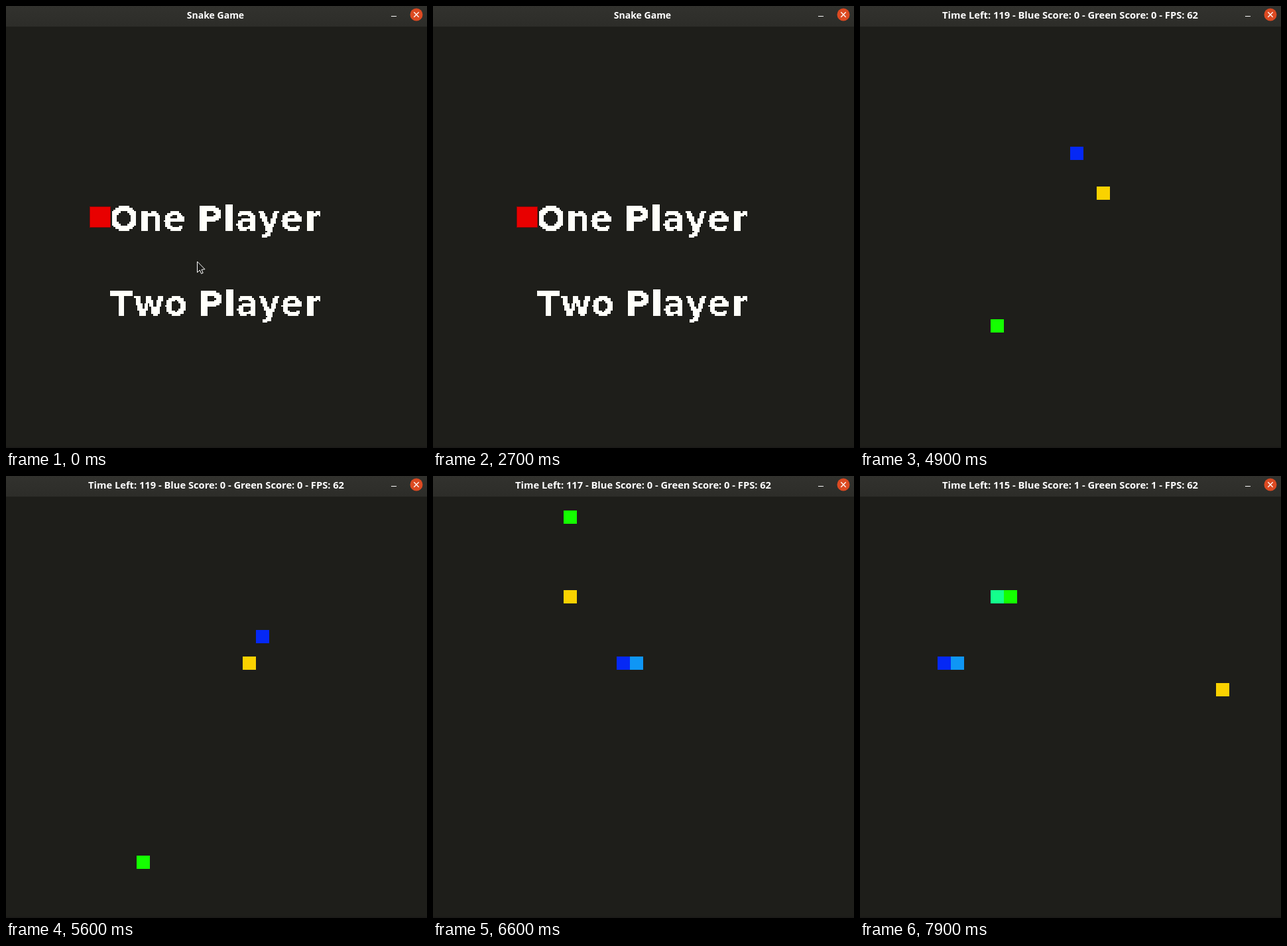
Animation, 635 px wide and 666 px high, one loop 8000 ms. Source, as an HTML page with a canvas:

```html
<!DOCTYPE html>
<html lang="en">
<head>
<meta charset="utf-8">
<title>Snake Game</title>
<style>
  html, body { margin: 0; width: 100%; height: 100%; overflow: hidden; background: #1e1e1a; }
  canvas { display: block; }
</style>
</head>
<body>
<canvas id="stage" width="635" height="666"></canvas>
<script>
const ctx = document.getElementById('stage').getContext('2d');
const LOOP = 8000, GAME_START = 3900, BACKGROUND = '#1e1e1a';
const CELL = 20, LEFT = -3, TOP = 32, GRID = 32, TICK = 161;
const DIRS = { U: [0, -1], D: [0, 1], L: [-1, 0], R: [1, 0] };

// A run of steps at an even pace, shown on the nearest tenth of a second
function run(path, from, every = TICK) {
  return [...path].map((dir, i) => ({ dir, time: Math.round((from + i * every) / 100) * 100 }));
}

const snakes = [
  {
    start: [10, 16], head: '#14ff00', tail: '#14ff8c',
    steps: [...run('D'.repeat(7), 4080), ...run('D'.repeat(16), 5130, 165), ...run('R', 7900)]
  },
  {
    start: [16, 15], head: '#0528f5', tail: '#0f96f5',
    steps: [...run('U'.repeat(7), 4080), ...run('RRRDDDD', 5130, 123), ...run('L'.repeat(13), 5968)]
  }
];
const foods = [[18, 12], [10, 7], [27, 14]];
const allSteps = snakes
  .flatMap((snake, id) => snake.steps.map(step => ({ ...step, id })))
  .sort((a, b) => a.time - b.time);

function play(t) {
  const players = snakes.map(({ start }) => ({ body: [start], score: 0 }));
  let eaten = 0;
  for (const { id, dir, time } of allSteps) {
    if (time > t) break;
    const player = players[id], [x, y] = player.body[0], [dx, dy] = DIRS[dir];
    const head = [x + dx, (y + dy + GRID) % GRID];
    player.body = [head, ...player.body].slice(0, player.score + 1);
    if (String(head) === String(foods[eaten])) {
      player.score++;
      eaten++;
    }
  }
  return { players, food: foods[eaten] };
}

function box(x, y, w, h, color) {
  ctx.fillStyle = color;
  ctx.fillRect(x, y, w, h);
}

function line(color, width, ...points) {
  ctx.beginPath();
  points.forEach(([x, y]) => ctx.lineTo(x, y));
  ctx.strokeStyle = color;
  ctx.lineWidth = width;
  ctx.stroke();
}

function cell([col, row], color) {
  box(LEFT + col * CELL, TOP + row * CELL, CELL, CELL, color);
}

// Hard-edged small text on whole-pixel advances, to be magnified
function pixelText(text) {
  const small = document.createElement('canvas');
  const c = small.getContext('2d', { willReadFrequently: true });
  const font = 'bold 20px "DejaVu Sans", sans-serif';
  c.font = font;
  const advances = [...text].map(ch => ch === ' ' ? 6 : Math.round(c.measureText(ch).width));
  small.width = advances.reduce((sum, w) => sum + w);
  small.height = 24;
  c.font = font;
  c.fillStyle = '#fffffa';
  let x = -0.5;
  [...text].forEach((ch, i) => {
    c.fillText(ch, x, 19);
    x += advances[i];
  });
  const image = c.getImageData(0, 0, small.width, small.height);
  for (let i = 3; i < image.data.length; i += 4) {
    image.data[i] = image.data[i] > 155 ? 255 : 0;
  }
  c.putImageData(image, 0, 0);
  return small;
}
const options = ['One Player', 'Two Player'].map(pixelText);

function drawWindow(title, size, center) {
  box(0, 0, 635, 666, BACKGROUND);
  const bar = ctx.createLinearGradient(0, 0, 0, 30);
  bar.addColorStop(0, '#32322e');
  bar.addColorStop(1, '#2d2d29');
  box(0, 0, 635, 31, bar);
  box(0, 664, 635, 2, '#1b1a18');

  ctx.font = `bold ${size}px "Open Sans", sans-serif`;
  ctx.textAlign = 'center';
  ctx.fillStyle = '#fff';
  ctx.fillText(title, center, 19);

  box(581, 15, 8, 1, '#fff');
  ctx.beginPath();
  ctx.arc(619, 13, 9.5, 0, Math.PI * 2);
  ctx.fillStyle = '#dc4a22';
  ctx.fill();
  line('#fff', 1.3, [615.3, 9.3], [622.7, 16.7]);
  line('#fff', 1.3, [622.7, 9.3], [615.3, 16.7]);
}

function drawPointer() {
  const arrow = new Path2D('M288.5 385v16.5l3.8-3.5 2.3 5.3 2.6-1.1-2.2-5 5-.5z');
  ctx.fillStyle = '#1b1b18';
  ctx.fill(arrow);
  ctx.strokeStyle = '#fff';
  ctx.lineWidth = 1;
  ctx.stroke(arrow);
}

function drawMenu(t) {
  drawWindow('Snake Game', 14, 316);
  const second = (t >= 1100 && t < 2700) || t >= 3000;
  const y = second ? 430 : 302;
  box(126, y, 32, 32, '#900403');
  box(127, y + 1, 30, 30, '#e80000');
  ctx.imageSmoothingEnabled = false;
  options.forEach((image, i) => ctx.drawImage(image, 157, 288 + i * 128, 320, 64));
  if (t < 200) drawPointer();
}

function drawGame(t) {
  // The title is refreshed once a second
  const updates = Math.floor((t - GAME_START) / 1000);
  const [green, blue] = play(GAME_START + updates * 1000).players;
  const timeLeft = 120 - Math.round(updates * 1.3);
  const fps = updates ? 62 : 646;
  drawWindow(`Time Left: ${timeLeft} - Blue Score: ${blue.score} - Green Score: ${green.score} - FPS: ${fps}`,
    14.7, 317);

  const { players, food } = play(t);
  cell(food, '#fad200');
  players.forEach(({ body }, id) =>
    body.forEach((part, i) => cell(part, i ? snakes[id].tail : snakes[id].head)));
}

const begin = performance.now();
function frame() {
  const t = (performance.now() - begin) % LOOP;
  if (t < GAME_START) drawMenu(t);
  else drawGame(t);
  requestAnimationFrame(frame);
}
frame();
</script>
</body>
</html>
```
